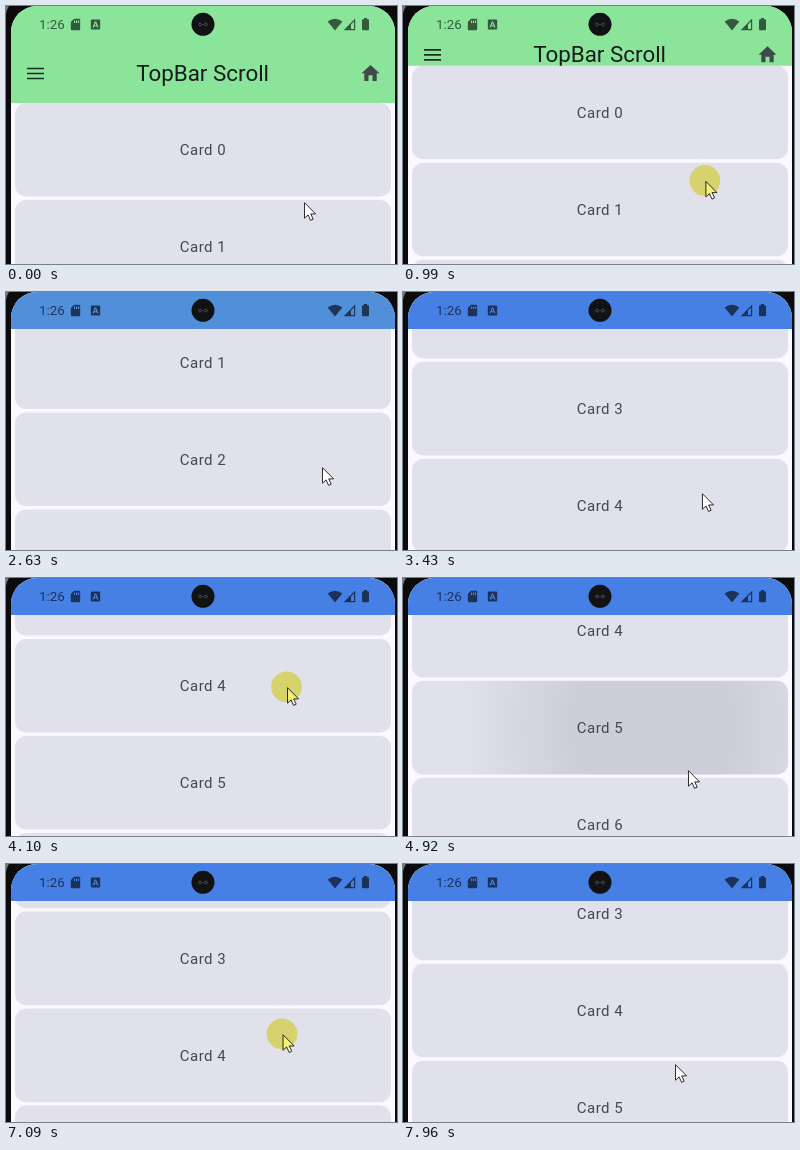
Write an HTML page that moves like this. It is 391x258 px and loops after 8000 ms.

```html
<!DOCTYPE html>
<html lang="en">
<head>
<meta charset="utf-8">
<title>Collapsing top bar</title>
<style>
  html, body { margin: 0; width: 100%; height: 100%; overflow: hidden; background: #0b0b0d; }
  svg { display: block; width: 391px; height: 258px; font-family: Roboto, "Open Sans", sans-serif; }
  .card { fill: #e1e1eb; }
  .label { fill: #45464f; font-size: 15px; letter-spacing: .47px; text-anchor: middle; }
  .title { fill: #1a1c1e; font-size: 22.4px; text-anchor: middle; }
  #press { fill: #f3f078; mix-blend-mode: multiply; }
</style>
</head>
<body>
<svg viewBox="0 0 391 258">
  <defs>
    <clipPath id="screenClip"><path d="M5 258V26A26 26 0 0 1 31 0H363A26 26 0 0 1 389 26V258Z"/></clipPath>
    <clipPath id="barClip"><rect id="barClipRect" x="5" y="37" width="384" height="60"/></clipPath>
    <clipPath id="rippleClip"><rect id="rippleClipRect" x="9" width="376" height="93.6" rx="11.3"/></clipPath>
    <radialGradient id="rippleFill">
      <stop offset=".42" stop-color="#45464f" stop-opacity=".127"/>
      <stop offset="1" stop-color="#45464f" stop-opacity="0"/>
    </radialGradient>
  </defs>

  <rect width="391" height="258" fill="#0b0b0d"/>
  <path d="M0 0H3Q1 3 0 8Z" fill="#6d7a72"/>

  <g clip-path="url(#screenClip)">
    <rect width="391" height="258" fill="#fbf8ff"/>
    <g id="list">
      <g id="cards"></g>
      <g clip-path="url(#rippleClip)"><circle id="ripple" cx="250" fill="url(#rippleFill)"/></g>
      <g id="labels"></g>
    </g>

    <rect id="bar" width="391" height="97"/>
    <g clip-path="url(#barClip)">
      <g id="barContent">
        <path d="M21 62.5H38M21 67.5H38M21 72.5H38" stroke="#1f2a24" stroke-width="1.7"/>
        <text class="title" x="196.6" y="75">TopBar Scroll</text>
        <path d="M362.5 75V69.3H366.5V75H370.7V67.3H373.5L364.5 59L355.5 67.3H358.3V75Z" fill="#41494a"/>
      </g>
    </g>

    <g fill="#000" fill-opacity=".61">
      <text x="33" y="23" font-size="13.4">1:26</text>
      <path fill-rule="evenodd" d="M68 12.8H73Q74.2 12.8 74.2 14V23Q74.2 24.2 73 24.2H66Q64.8 24.2 64.8 23V16ZM68 14.6V17H69.1V14.6ZM70 14.6V17H71.1V14.6ZM72 14.6V17H73.1V14.6Z"/>
      <path fill-rule="evenodd" d="M85.8 13.6H93.2Q94.2 13.6 94.2 14.6V22.4Q94.2 23.4 93.2 23.4H85.8Q84.8 23.4 84.8 22.4V14.6Q84.8 13.6 85.8 13.6ZM88.9 15.4L86.5 21.6H87.7L88.2 20.2H90.8L91.3 21.6H92.5L90.1 15.4ZM89.5 16.8L90.4 19.2H88.6Z"/>
      <path d="M321.6 15.6Q329 9.8 336.4 15.6L329 24.4Z"/>
      <path fill-rule="evenodd" d="M349.2 12.6V24.2H337.6ZM348 15.5L345 18.5V23H348Z"/>
      <path d="M358 12V13.2H357Q356 13.2 356 14.2V23.2Q356 24.2 357 24.2H362Q363 24.2 363 23.2V14.2Q363 13.2 362 13.2H361V12Z"/>
    </g>
    <circle cx="197" cy="18.3" r="11.5" fill="#111214"/>
    <g fill="none" stroke="#55585c" stroke-width=".8">
      <circle cx="194" cy="18.5" r="1.4"/>
      <circle cx="200" cy="18.5" r="1.4"/>
      <path d="M196.3 18.5H197.7"/>
    </g>
  </g>

  <g id="pointer">
    <path d="M.5 .7V16.2L4.1 12.9L6.6 18.4L9.2 17.2L6.7 11.9H11.6Z" fill="#fff" stroke="#16181c" stroke-width=".9" stroke-linejoin="round"/>
    <circle id="press" cx="-.5" cy="-.2" r="15.4"/>
  </g>
</svg>
<script>
const LOOP = 8000, PITCH = 97, CARD = 93.6, STATUS = 37, BAR = 60;
const GREEN = [138, 229, 154], BLUE = [71, 128, 229];
const COLOR_START = 2460, FLING_DECAY = 750;
const $ = id => document.getElementById(id);
const set = (el, attrs) => { for (const k in attrs) el.setAttribute(k, attrs[k]); };
const clamp = v => Math.min(1, Math.max(0, v));
const ease = u => u * u * (3 - 2 * u);
const mix = (a, b, u) => a + (b - a) * u;

// Dragging moves the list with the pointer; a fling coasts until the next drag.
const drag = (at, dur, from, to, fling = 0) => ({ at, end: at + dur, from, to, fling });
const hover = (at, point) => ({ at, end: at, from: point, to: point });
const drags = [
  drag(780, 320, [298, 212], [304, 161], 2),
  drag(2390, 110, [313, 208], [315, 133], 268),
  drag(3560, 540, [298, 202.5], [281, 109], 83),
  drag(4930, 320, [285, 192], [284, 230]),
  drag(5560, 430, [274, 104], [274, 201]),
  drag(6140, 300, [274, 201], [274, 236]),
  drag(6880, 470, [274, 201], [280, 128], 5)
];
const stops = [
  ...drags,
  hover(70, [298, 196]), hover(1520, [308, 208]), hover(2630, [316, 175]), hover(7800, [272, 200])
].sort((a, b) => a.at - b.at);
const taps = [{ at: 1200, card: 1 }, { at: 4790, card: 5 }];

function scrollAt(t) {
  return drags.reduce((sum, d, i) => {
    const stop = drags[i + 1]?.at ?? LOOP;
    const coast = Math.max(0, Math.min(t, stop) - d.end);
    return sum + (d.from[1] - d.to[1]) * ease(clamp((t - d.at) / (d.end - d.at)))
      + d.fling * (1 - Math.exp(-coast / FLING_DECAY));
  }, 0);
}

function pointerAt(t) {
  const i = stops.findLastIndex(s => s.at <= t);
  if (i < 0) return stops[0].from;
  const s = stops[i], next = stops[i + 1];
  const glide = (a, b, t0, t1) => {
    const u = ease(clamp((t - t0) / (t1 - t0)));
    return [mix(a[0], b[0], u), mix(a[1], b[1], u)];
  };
  if (t < s.end) return glide(s.from, s.to, s.at, s.end);
  return next ? glide(s.to, next.from, s.end, next.at) : s.to;
}

function barColor(t) {
  const w = Math.max(0, t - COLOR_START) * 0.02;
  const u = 1 - (1 + w) * Math.exp(-w);
  return `rgb(${GREEN.map((c, i) => Math.round(mix(c, BLUE[i], u)))})`;
}

function add(parent, tag, attrs, text = "") {
  const el = document.createElementNS("http://www.w3.org/2000/svg", tag);
  set(el, attrs);
  el.textContent = text;
  parent.append(el);
}

const cardTop = n => PITCH * (n + 1);
for (let n = 0; n < 8; n++) {
  const y = cardTop(n);
  add($("cards"), "rect", { class: "card", x: 9, y, width: 376, height: CARD, rx: 11.3 });
  add($("labels"), "text", { class: "label", x: 197, y: y + 52.2 }, "Card " + n);
}

function drawRipple(t) {
  const tap = taps.find(r => t >= r.at && t < r.at + 500);
  if (!tap) return set($("ripple"), { opacity: 0 });
  const age = t - tap.at, y = cardTop(tap.card);
  set($("rippleClipRect"), { y });
  set($("ripple"), {
    cy: y + CARD / 2,
    r: 40 + age * 1.16 + Math.max(0, age - 150) * 3,
    opacity: clamp((500 - age) / 270)
  });
}

function draw(t) {
  const scroll = scrollAt(t);
  const height = Math.max(0, BAR - scroll);
  set($("list"), { transform: `translate(0 ${-scroll})` });
  set($("bar"), { height: STATUS + height, fill: barColor(t) });
  set($("barClipRect"), { height });
  set($("barContent"), { transform: `translate(0 ${(height - BAR) / 2})` });
  drawRipple(t);
  set($("pointer"), { transform: `translate(${pointerAt(t)})` });
  const pressed = drags.some(d => t >= d.at && t < d.end + 60);
  set($("press"), { visibility: pressed ? "visible" : "hidden" });
}

const start = performance.now();
function tick() {
  draw((performance.now() - start) % LOOP);
  requestAnimationFrame(tick);
}
draw(0);
requestAnimationFrame(tick);
</script>
</body>
</html>
```
